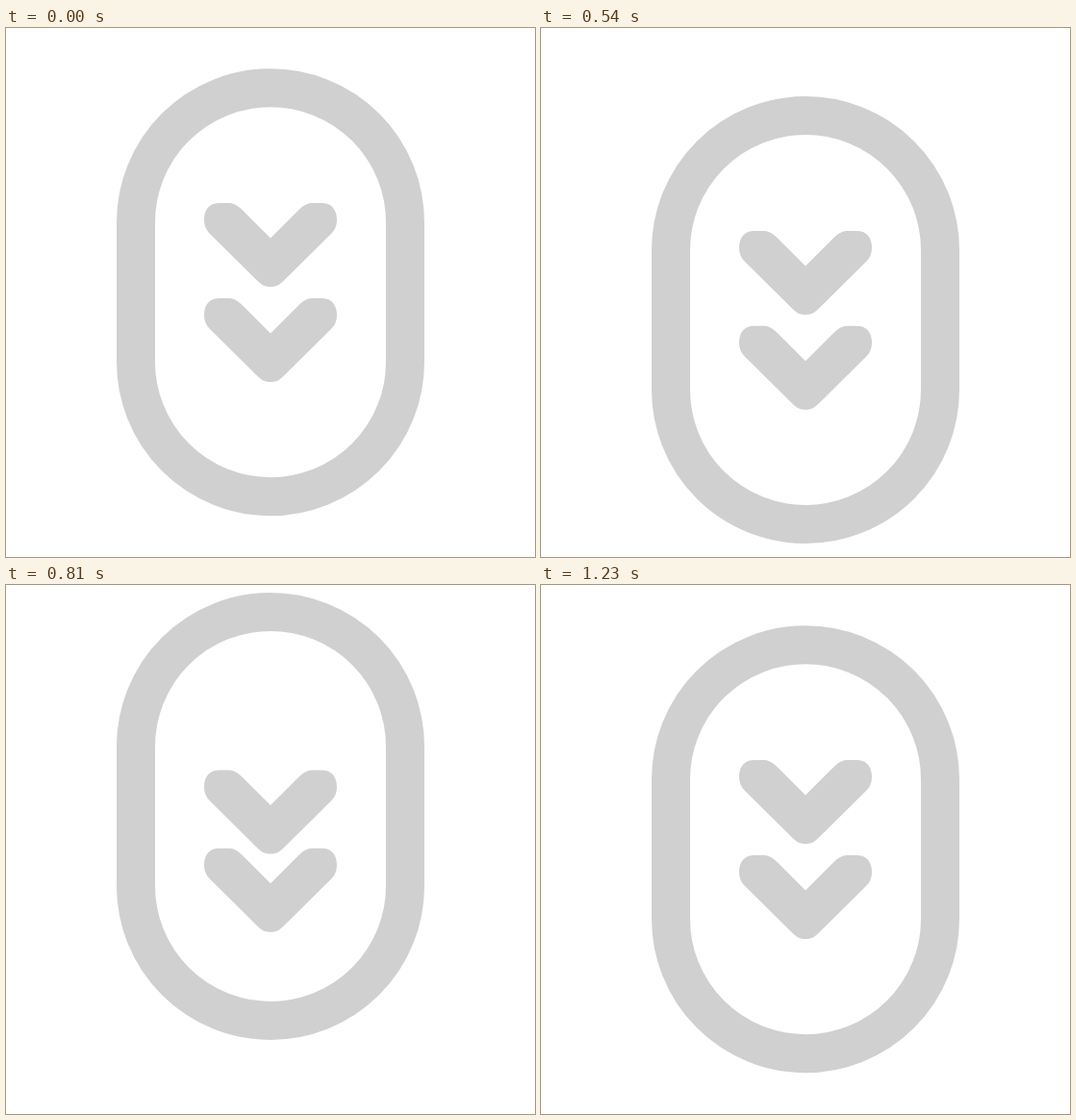
An HTML page that plays this animation: 550x550 px, repeating every 1800 ms.

```html
<!DOCTYPE html>
<html lang="en">
<head>
<meta charset="utf-8">
<title>Scroll down</title>
<style>
  html, body { margin: 0; width: 100%; height: 100%; overflow: hidden; background: #fff; }
  svg { display: block; width: 100%; height: 100%; }
</style>
</head>
<body>
<svg viewBox="0 0 550 550" fill="#d0d0d0">
  <defs>
    <path id="chevron" d="M275 218.5 L246 189.5 C240 183.5 235.5 182 231 182 L222 182
      C212 182 206 188 206 199.5 C206 205.5 208 210 212 214
      L260 261.5 C265 266.5 268 269 275 269 C282 269 285 266.5 290 261.5
      L338 214 C342 210 344 205.5 344 199.5 C344 188 338 182 328 182
      L319 182 C314.5 182 310 183.5 304 189.5 Z"/>
  </defs>
  <rect id="ring" x="135" y="62.2" width="280" height="425" rx="140"
        fill="none" stroke="#d0d0d0" stroke-width="40"/>
  <use id="upper" href="#chevron"/>
  <use id="lower" href="#chevron" y="99"/>
</svg>
<script>
const LOOP = 1800, STEP = 30, DROP_END = 330, RISE_START = 412;

// Each part drops, accelerates up to its peak, then settles back.
const parts = [
  { id: 'ring',  drop: 32, peak: 808, height: 35,   power: 2.7,  end: 1275 },
  { id: 'upper', drop: 29, peak: 917, height: 57.6, power: 6.49, end: 1291 },
  { id: 'lower', drop: 29, peak: 873, height: 43.6, power: 4.73, end: 1242 }
].map(part => ({ ...part, node: document.getElementById(part.id) }));

const progress = (t, from, to) => Math.min(1, Math.max(0, (t - from) / (to - from)));
const smooth = u => u * u * (3 - 2 * u);

function offset({ drop, peak, height, power, end }, t) {
  if (t < RISE_START) return drop * smooth(progress(t, 0, DROP_END));
  if (t < peak) return drop - (drop + height) * progress(t, RISE_START, peak) ** power;
  return -height * (1 - progress(t, peak, end)) ** 5;
}

function draw() {
  const t = Math.floor(performance.now() % LOOP / STEP) * STEP;
  for (const part of parts) {
    part.node.setAttribute('transform', `translate(0 ${offset(part, t).toFixed(2)})`);
  }
  requestAnimationFrame(draw);
}
draw();
</script>
</body>
</html>
```
